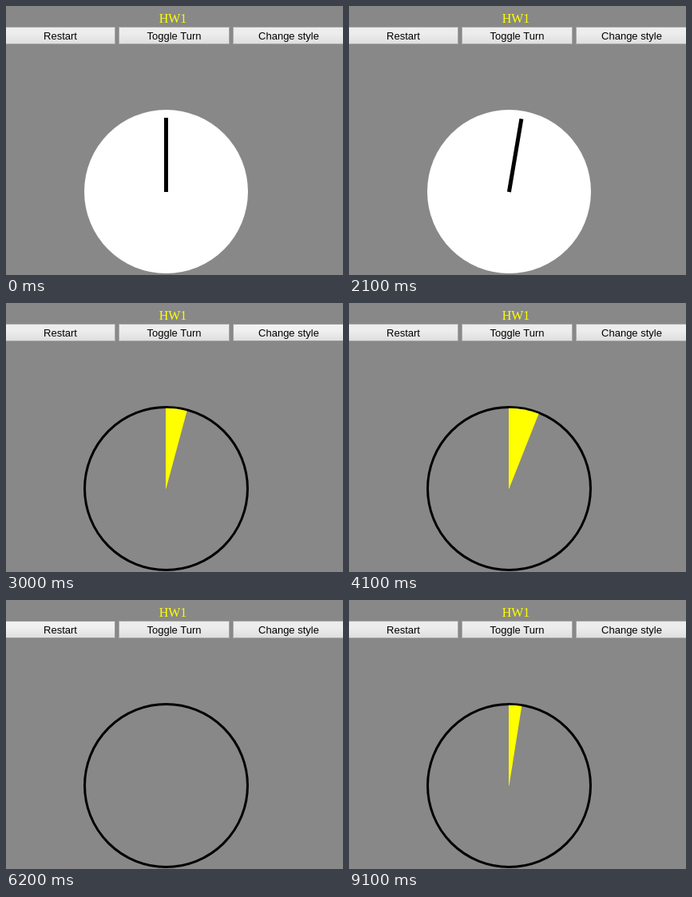
An HTML page for the animation above (9400 ms loop, 422 by 337 pixels).

```html
<!DOCTYPE html>
<html lang="en">
<head>
<meta charset="utf-8">
<title>Stopwatch</title>
<style>
  html, body { margin: 0; width: 100%; height: 100%; overflow: hidden; background: #888; }
  svg { display: block; }
  text { text-anchor: middle; }
  .title { font: 16px "Liberation Serif", serif; fill: #ff0; }
  .button rect { fill: url(#idle); stroke: #a8a8a8; }
  .button text { font: 13px "Liberation Sans", sans-serif; fill: #000; }
  .hover rect { fill: url(#lit); stroke: #999; }
  .pressed rect { fill: #ddd; }
</style>
</head>
<body>
<svg width="422" height="337" viewBox="0 0 422 337">
  <defs>
    <linearGradient id="idle" x2="0" y2="1">
      <stop stop-color="#ededed"/><stop offset=".38" stop-color="#ededed"/><stop offset="1" stop-color="#dedede"/>
    </linearGradient>
    <linearGradient id="lit" x2="0" y2="1">
      <stop stop-color="#f2f2f2"/><stop offset=".38" stop-color="#f0f0f0"/><stop offset="1" stop-color="#dfdfdf"/>
    </linearGradient>
  </defs>
  <text class="title" x="209" y="21">HW1</text>
  <g class="button"><rect x="-1.5" y="26.5" width="138" height="21"/><text x="68" y="42">Restart</text></g>
  <g class="button"><rect x="141.5" y="26.5" width="138" height="21"/><text x="210.5" y="42">Toggle Turn</text></g>
  <g class="button"><rect x="284.5" y="26.5" width="139" height="21"/><text x="354" y="42">Change style</text></g>
  <g transform="translate(200.5 232.5)">
    <g id="handStyle">
      <circle r="102.5" fill="#fff"/>
      <path id="hand" d="M0 .5V-92.5" stroke="#000" stroke-width="5"/>
    </g>
    <g id="pieStyle">
      <circle r="102" fill="none" stroke="#000" stroke-width="3"/>
      <path id="wedge" fill="#ff0"/>
    </g>
  </g>
</svg>
<script>
const LOOP = 9400, STEP = 100, DEGREES_PER_STEP = 0.6;
const STYLE_CHANGE = 3000, RESET = 6200;
const WEDGE_RADIUS = 100.8;
const [RESTART, TOGGLE, STYLE] = [0, 1, 2];

// [button, mouse enters, mouse leaves]
const hovers = [
  [TOGGLE, 400, 1100], [STYLE, 2200, 3400], [STYLE, 4700, 4900], [TOGGLE, 5000, 5500],
  [RESTART, 5600, 6700], [TOGGLE, 6700, 8900], [STYLE, 8900, 9100]
];
// [button, mouse down, mouse up]
const presses = [[TOGGLE, 600, 700], [STYLE, 2900, 3000], [TOGGLE, 6900, 7000]];

const byId = id => document.getElementById(id);
const buttons = document.querySelectorAll('.button');

const isActive = (spans, button, t) =>
  spans.some(([b, from, to]) => b === button && t >= from && t < to);

function stepsSince(start, limit, t) {
  return Math.max(0, Math.min(limit, Math.floor((t - start) / STEP)));
}

function draw() {
  const t = performance.now() % LOOP;
  const steps = t < RESET ? stepsSince(500, 48, t) : stepsSince(7200, 15, t);
  const degrees = steps * DEGREES_PER_STEP;
  const angle = degrees * Math.PI / 180;
  const pie = t >= STYLE_CHANGE;

  byId('handStyle').style.display = pie ? 'none' : '';
  byId('pieStyle').style.display = pie ? '' : 'none';
  byId('hand').setAttribute('transform', `rotate(${degrees})`);

  const x = WEDGE_RADIUS * Math.sin(angle), y = -WEDGE_RADIUS * Math.cos(angle);
  byId('wedge').setAttribute('d', steps
    ? `M-.5 0V${-WEDGE_RADIUS}H0A${WEDGE_RADIUS} ${WEDGE_RADIUS} 0 0 1 ${x} ${y}L0 0Z`
    : '');

  buttons.forEach((button, i) => {
    button.classList.toggle('hover', isActive(hovers, i, t));
    button.classList.toggle('pressed', isActive(presses, i, t));
  });
  requestAnimationFrame(draw);
}
draw();
</script>
</body>
</html>
```
